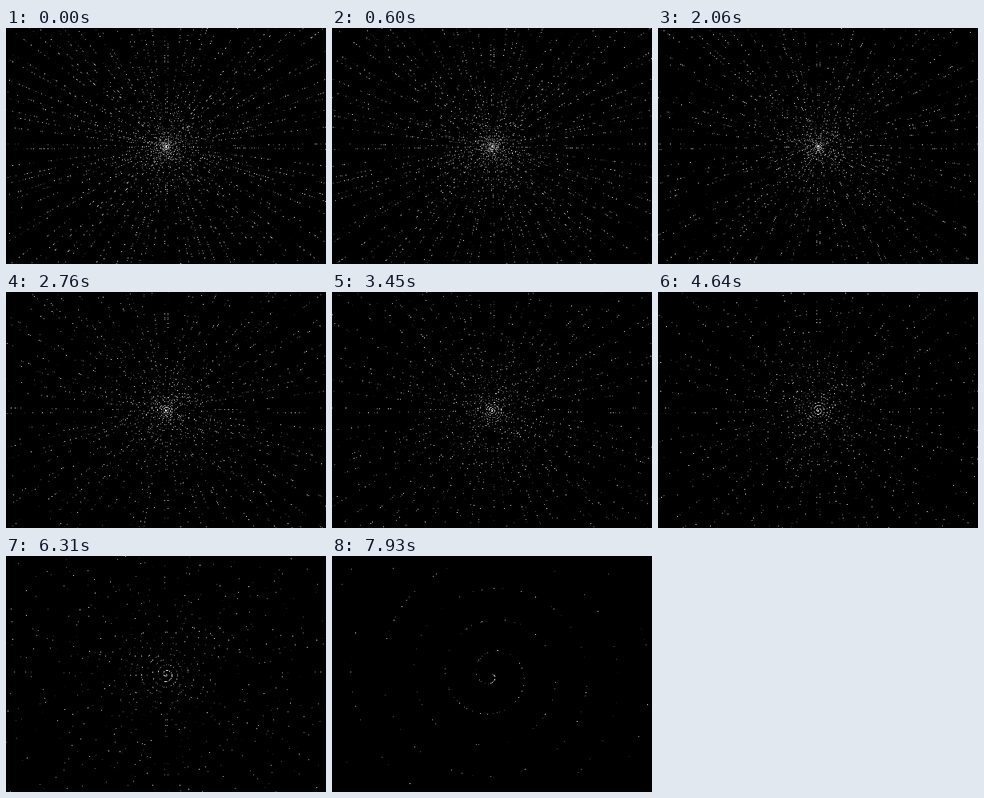
Write an HTML page with a canvas that moves like this. It is 400 px wide and 296 px high and loops after 8000 ms.

```html
<!DOCTYPE html>
<html lang="en">
<head>
<meta charset="utf-8">
<title>Primes in polar coordinates</title>
<style>
  html, body { margin: 0; width: 100%; height: 100%; overflow: hidden; background: #000; }
  canvas { display: block; width: 400px; height: 296px; }
</style>
</head>
<body>
<canvas id="stage" width="400" height="296"></canvas>
<script>
const W = 400, H = 296, CX = 200, CY = 148.3;
const LOOP = 8000, STEP = 69.6, LEAD = 44, LAST = 114;
const REACH = 250, DOT = 0.48, GAIN = 1.3;
const ctx = document.getElementById('stage').getContext('2d');

function primesBelow(limit) {
  const composite = new Uint8Array(limit), found = [];
  for (let n = 2; n < limit; n++) {
    if (composite[n]) continue;
    found.push(n);
    for (let m = n * n; m < limit; m += n) composite[m] = 1;
  }
  return found;
}

// Units per pixel; shrinks steadily as the view zooms in.
const unitsPerPixel = step => 9.16 + 1.87 * (LAST - step);

// Each prime p sits at radius p and an angle of p degrees.
const points = primesBelow(Math.ceil(REACH * unitsPerPixel(0))).map(p => {
  const a = p * Math.PI / 180;
  return { p, x: p * Math.cos(a), y: p * Math.sin(a) };
});

// A dot lights one pixel, brighter the nearer it is to the pixel's centre.
function dot(x, y) {
  const col = Math.round(x), row = Math.round(y);
  const light = GAIN * (1 - Math.hypot(x - col, y - row) / DOT);
  if (light <= 0) return;
  ctx.globalAlpha = Math.min(1, light);
  ctx.fillRect(col, row, 1, 1);
}

function draw(step) {
  const units = unitsPerPixel(step), limit = REACH * units;
  ctx.globalAlpha = 1;
  ctx.fillStyle = '#000';
  ctx.fillRect(0, 0, W, H);
  ctx.fillStyle = '#fff';
  for (const { p, x, y } of points) {
    if (p > limit) break;
    dot(CX + x / units, CY + y / units);
  }
}

let shown = -1;
function tick() {
  const t = performance.now() % LOOP;
  const step = Math.min(LAST, Math.floor((t + LEAD) / STEP));
  if (step !== shown) draw(shown = step);
  requestAnimationFrame(tick);
}
tick();
</script>
</body>
</html>
```
